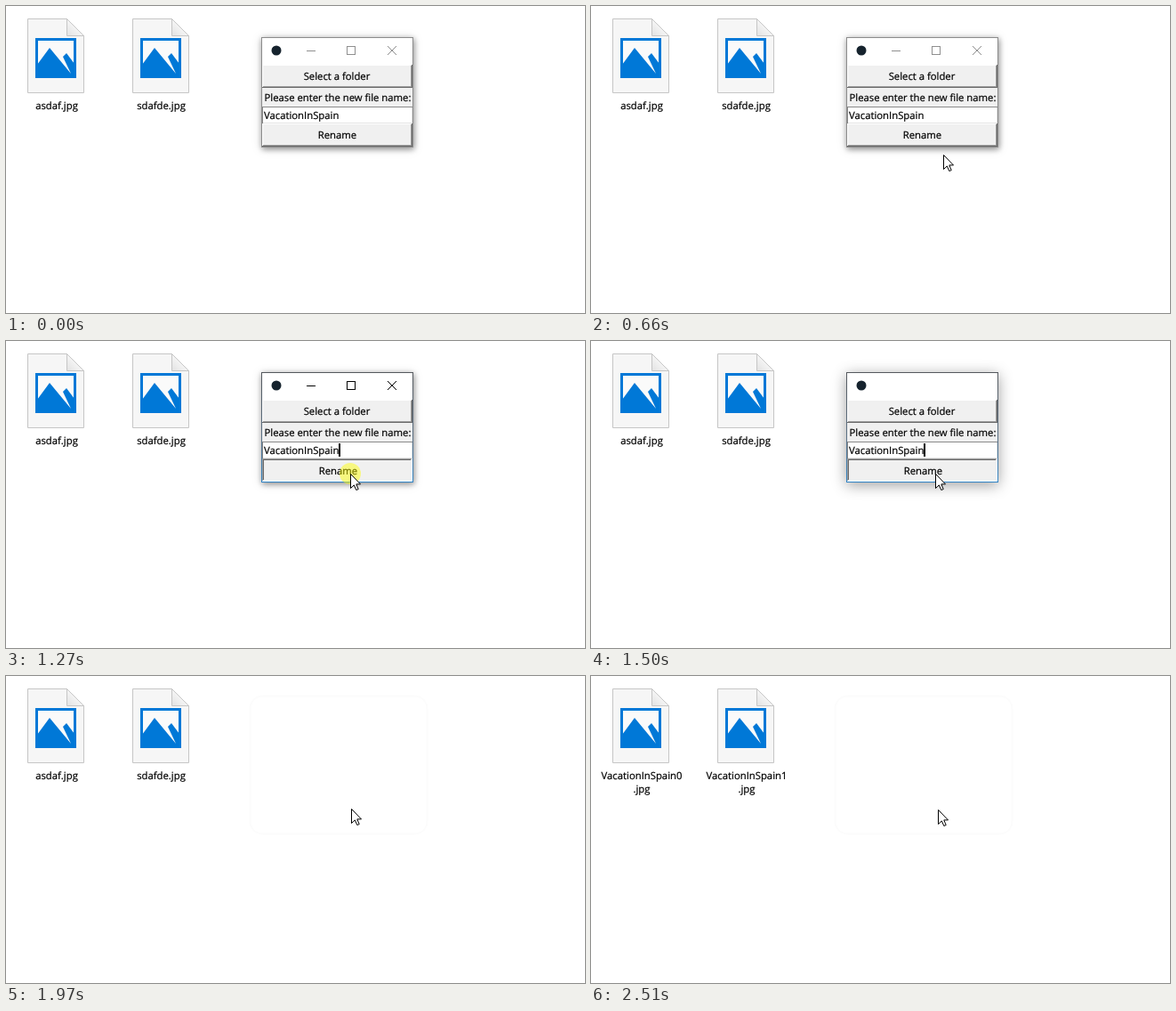
Recreate the animation shown at these times as an HTML page. Size 651 by 345 pixels, loop 3060 ms.

```html
<!DOCTYPE html>
<html lang="en">
<head>
<meta charset="utf-8">
<title>Batch rename</title>
<style>
  html, body { margin: 0; width: 100%; height: 100%; overflow: hidden; background: #fff; }
  svg { display: block; width: 651px; height: 345px; }
  text {
    font: 11.3px "Open Sans", "Noto Sans", sans-serif;
    fill: #000; stroke: #000; stroke-width: .22px;
    text-rendering: geometricPrecision;
  }
  .mid { text-anchor: middle; }
  .crisp { shape-rendering: crispEdges; }
  .line { fill: none; stroke-width: 1; }

  .before, .after, .idle, .active, .caption, .click, .ghost, .win, .cursor, .glow {
    animation: 3060ms step-end infinite;
  }
  .before { animation-name: before; }
  .after { animation-name: after; }
  .idle { animation-name: idle; }
  .active { animation-name: active; }
  .caption { animation-name: caption; }
  .click { animation-name: click; }
  .ghost { animation-name: ghost; }
  .glow { animation-name: glow; }
  .win { animation-name: close; transform-origin: 372.5px 96.5px; }
  .cursor { animation-name: move; }

  @keyframes before { 0% { opacity: 1 } 82.026%, 100% { opacity: 0 } }
  @keyframes after { 0% { opacity: 0 } 82.026%, 100% { opacity: 1 } }
  @keyframes idle { 0% { opacity: 1 } 41.503%, 100% { opacity: 0 } }
  @keyframes active { 0% { opacity: 0 } 41.503%, 100% { opacity: 1 } }
  @keyframes caption {
    0% { stroke: #8f8f8f; opacity: 1 }
    41.503% { stroke: #000; opacity: 1 }
    49.019%, 100% { stroke: #000; opacity: 0 }
  }
  @keyframes glow {
    0% { filter: drop-shadow(1px 2px 3px rgba(0,0,0,.34)) drop-shadow(0 1px 5px rgba(0,0,0,.18)) }
    49.019%, 100% { filter: drop-shadow(0 3px 8px rgba(0,0,0,.38)) }
  }
  @keyframes close {
    0% { opacity: 1; transform: none }
    51.633% { opacity: .22; transform: translate(-1.3px, -.6px) scale(.962) }
    54.575%, 100% { opacity: 0; transform: none }
  }
  @keyframes ghost { 0% { opacity: 0 } 54.575%, 100% { opacity: 1 } }
  @keyframes click {
    0% { opacity: 0 }
    41.503% { opacity: .47 }
    49.019% { opacity: 0 }
    71.568% { opacity: .47 }
    77.124%, 100% { opacity: 0 }
  }
  @keyframes move {
    0% { transform: translate(660px, 360px) }
    3.594% { transform: translate(525px, 333px) }
    6.209% { transform: translate(486px, 297px) }
    8.823% { transform: translate(453px, 267px) }
    11.437% { transform: translate(428px, 244px) }
    14.052% { transform: translate(414px, 220px) }
    16.339% { transform: translate(404px, 199px) }
    18.627% { transform: translate(399px, 185px) }
    21.568% { transform: translate(396px, 167px) }
    24.182% { transform: translate(393px, 154px) }
    29.084% { transform: translate(391px, 153px) }
    31.372% { transform: translate(389px, 151px) }
    33.66% { transform: translate(387px, 149px) }
    64.379% { transform: translate(388px, 149px) }
    66.993%, 100% { transform: translate(390px, 150px) }
  }
</style>
</head>
<body>
<svg viewBox="0 0 651 345">
  <defs>
    <linearGradient id="fold" x1="0" y1="1" x2="1" y2="0">
      <stop offset="0" stop-color="#e2e2e2"/>
      <stop offset=".5" stop-color="#f4f4f4"/>
    </linearGradient>
    <linearGradient id="edge" x1="0" y1="0" x2="0" y2="1">
      <stop offset="0" stop-color="#55595e"/>
      <stop offset=".6" stop-color="#5b7186"/>
      <stop offset="1" stop-color="#2f83c4"/>
    </linearGradient>

    <g id="file">
      <path d="M.5.5H44.5L63.5 19.5V83.5H.5Z" fill="#f6f6f6" stroke="#c6c6c6"/>
      <path d="M44.500.5V19.500H63.500Z" fill="url(#fold)" stroke="#c6c6c6"/>
      <rect x="10.500" y="23.500" width="43" height="42" fill="#fafafa" stroke="#0078d7" stroke-width="3"/>
      <path d="M11 52L25 33L49 62L40 43L44 39L53 51V65H11Z" fill="#0078d7"/>
    </g>

    <g id="raised" class="crisp">
      <rect width="169" height="26" fill="#f0f0f0"/>
      <path class="line" stroke="#fff" d="M.5 25V.5H168"/>
      <path class="line" stroke="#a0a0a0" d="M1 24.500H167.500V1"/>
      <path class="line" stroke="#696969" d="M0 25.500H168.500V0"/>
    </g>
    <g id="sunken" class="crisp">
      <rect width="169" height="26" fill="#f0f0f0"/>
      <path class="line" stroke="#fff" d="M0 25.500H168.500V0"/>
      <path class="line" stroke="#a0a0a0" d="M.5 25V.5H168"/>
      <path class="line" stroke="#696969" d="M1.500 24V1.500H167"/>
    </g>
  </defs>

  <use href="#file" x="24" y="14"/>
  <use href="#file" x="142" y="14"/>
  <g class="before mid">
    <text x="57" y="116">asdaf.jpg</text>
    <text x="174.500" y="116">sdafde.jpg</text>
  </g>
  <g class="after mid">
    <text x="57" y="116">VacationInSpain0</text>
    <text x="57" y="131">.jpg</text>
    <text x="175" y="116">VacationInSpain1</text>
    <text x="175" y="131">.jpg</text>
  </g>

  <rect class="ghost" x="274.500" y="22.500" width="199" height="155" rx="14" fill="none" stroke="#fcfcfc" stroke-width="2"/>

  <g class="win">
    <rect class="glow" x="287" y="35" width="171" height="124" fill="#fff"/>
    <rect x="288" y="92" width="169" height="21" fill="#f0f0f0"/>
    <rect class="idle line" x="287.500" y="35.500" width="170" height="123" stroke="#8c8c8c"/>
    <rect class="active line" x="287.500" y="35.500" width="170" height="123" stroke="url(#edge)"/>

    <circle cx="304" cy="50" r="5.500" fill="#16232e"/>
    <g class="caption line">
      <path class="crisp" d="M338 50.500H348M383.500 45.500H392.500V54.500H383.500Z"/>
      <path d="M429 45L439 55M439 45L429 55"/>
    </g>

    <use href="#raised" x="288" y="66"/>
    <text class="mid" x="372" y="83">Select a folder</text>
    <text x="290.500" y="107">Please enter the new file name:</text>

    <g class="crisp">
      <rect x="288" y="113" width="169" height="19" fill="#fff"/>
      <path class="line" stroke="#e3e3e3" d="M289 131.500H456.500V114"/>
      <path class="line" stroke="#8a8a8a" d="M288.500 132V113.500H457"/>
    </g>
    <text x="290" y="127">VacationInSpain</text>

    <g class="idle">
      <use href="#raised" x="288" y="132"/>
      <text class="mid" x="372.500" y="149">Rename</text>
    </g>
    <g class="active">
      <rect x="374" y="115" width="2" height="15"/>
      <use href="#sunken" x="288" y="132"/>
      <text class="mid" x="373.500" y="150">Rename</text>
    </g>
  </g>

  <g class="cursor">
    <circle class="click" r="12" fill="#ff0"/>
    <path d="M.5.5V16.500L4.300 12.900L6.800 18.500L9.200 17.500L6.800 11.900H11.500Z" fill="#fff" stroke="#000"/>
  </g>
</svg>
</body>
</html>
```
